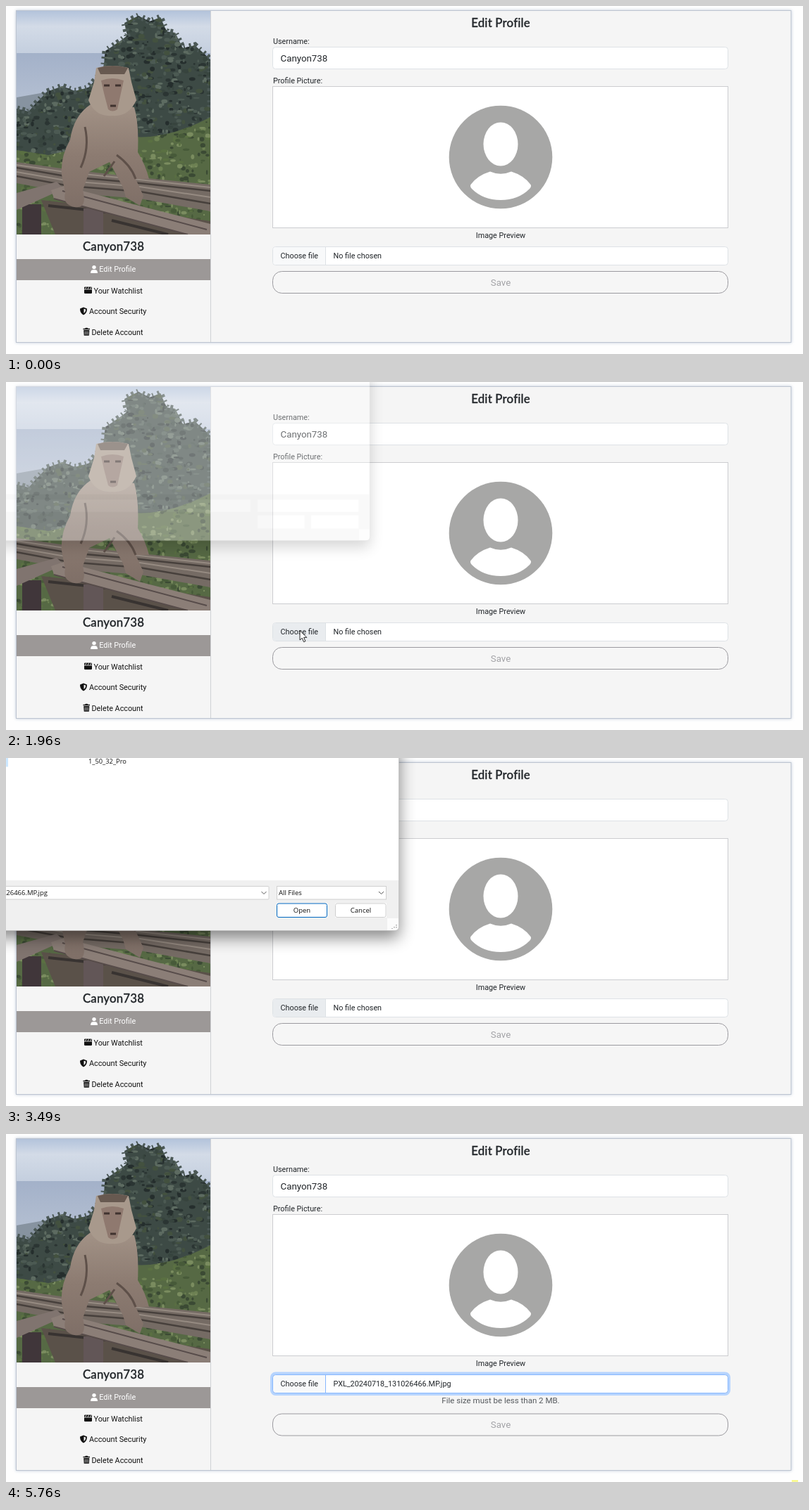
Animation of 1131 by 495 pixels, one loop 5.82 s. Source, as an HTML page:

```html
<!DOCTYPE html>
<html lang="en">
<head>
<meta charset="utf-8">
<title>Edit Profile</title>
<style>
  html, body { margin: 0; width: 100%; height: 100%; overflow: hidden; background: #fefefe; }
  svg { display: block; width: 1131px; height: 495px; font: 10.8px Roboto, sans-serif; fill: #212529; }
  .title { font: 500 16.8px Lato, sans-serif; letter-spacing: .2px; stroke: #212529; stroke-width: .3px; }
  .mid { text-anchor: middle; }
  .big { font-size: 13.3px; }
  .box { fill: #fff; stroke: #dee2e6; }
  #card { fill: #f5f5f5; stroke: #bcc4d0; filter: drop-shadow(0 0 2px #9fb0c8aa); }
  #dialog { font: 9.5px "Open Sans", sans-serif; fill: #111; }
  #dialog .frame { filter: drop-shadow(0 10px 11px #0007); }
  #dialog .control { fill: #fff; stroke: #d0d0d0; }
</style>
</head>
<body>
<svg viewBox="0 0 1131 495">
  <defs>
    <clipPath id="photoClip"><path d="M15 7H290V325H15Z"/></clipPath>
    <clipPath id="treeClip"><path id="trees" d="M138 92L141 64 162 50 172 42 168 24 188 14 204 22 219 16 228 36 240 38 251 60 268 56 290 76V230H15V146L32 150 58 122 80 114 98 121 117 116Z"/></clipPath>
    <clipPath id="grassClip"><path id="grass" d="M180 186Q230 190 290 158V325H15V205L60 212Z"/></clipPath>
    <linearGradient id="sky" x2="0" y2="1">
      <stop stop-color="#b3c3db"/><stop offset=".35" stop-color="#d3dbe7"/><stop offset="1" stop-color="#c3cede"/>
    </linearGradient>
    <linearGradient id="sea" x2="0" y2="1">
      <stop stop-color="#a3b1c9"/><stop offset="1" stop-color="#b7c2d3"/>
    </linearGradient>
    <linearGradient id="fur" x2="0" y2="1">
      <stop stop-color="#a29286"/><stop offset=".5" stop-color="#8c7b71"/><stop offset="1" stop-color="#7f6f67"/>
    </linearGradient>
  </defs>

  <rect id="card" x="14.5" y="6.5" width="1099.5" height="472"/>
  <path d="M290.5 7V478" stroke="#cfd1d5"/>

  <g id="photo" clip-path="url(#photoClip)">
    <path d="M15 7H290V70H15Z" fill="url(#sky)"/>
    <path d="M15 67H290V150H15Z" fill="url(#sea)"/>
    <path d="M15 130L60 122V155H15Z" fill="#8793a0"/>
    <use href="#trees" fill="#3d4a45" stroke="#4b5856" stroke-width="9" stroke-dasharray="4 5 2 6 3 4"/>
    <g id="leaves" clip-path="url(#treeClip)"></g>
    <use href="#grass" fill="#566944"/>
    <g id="blades" clip-path="url(#grassClip)"></g>
    <path d="M15 222L85 232 180 243 290 254V292L190 274 90 266 15 252Z" fill="#756b64"/>
    <path d="M15 230L90 243 180 251 290 263M15 242L90 256 190 264 290 281" fill="none" stroke="#47403c" stroke-width="2.500"/>
    <path d="M15 226L90 237 180 246 290 258M15 236L90 249 190 257 290 272" fill="none" stroke="#968b82" stroke-width="2"/>
    <path d="M50 276L180 290 290 306V325H70Z" fill="#5a5149"/>
    <path d="M60 284L180 297 290 318M150 305L230 325" fill="none" stroke="#383331" stroke-width="4"/>
    <path d="M23 282H50V325H23Z" fill="#40363a"/>
    <path d="M110 288H138V325H110Z" fill="#625657"/>
    <path d="M15 266L72 250 82 260 15 290Z" fill="#80746f"/>
    <path d="M64 262L82 256 200 287 290 310V325H258L68 274Z" fill="#8b7e77"/>
    <path d="M68 274L258 325M80 263L285 318" fill="none" stroke="#574c4a" stroke-width="2"/>
    <path d="M120 140Q96 156 91 190 77 215 79 240L84 266Q80 282 97 286 116 289 109 262L118 236 147 222 166 258 170 272 190 284 195 270 184 246H203Q198 226 187 208 189 168 182 144Z" fill="url(#fur)"/>
    <path d="M112 172Q119 202 106 230M154 221L139 242M157 212Q177 226 184 246" fill="none" stroke="#5e5049" stroke-width="3"/>
    <path d="M128 88Q150 82 174 88L178 108 185 134Q174 158 151 156 126 158 117 134L125 108Z" fill="#a8998c"/>
    <path d="M130 88Q151 82 173 88L168 97H134Z" fill="#675950"/>
    <path d="M135 106Q151 100 167 106L163 124 158 147Q151 152 145 147L139 124Z" fill="#8f796f"/>
    <path d="M139 113H147M155 113H163M148 142H156" stroke="#40332f" stroke-width="3"/>
  </g>

  <text class="title mid" x="152.500" y="348">Canyon738</text>
  <path d="M15 360H290V390H15Z" fill="#9c9897"/>
  <g fill="#fff">
    <circle cx="125" cy="371.600" r="2.700"/><path d="M120 380Q120 375.300 123.500 375.300H126.500Q130 375.300 130 380Z"/>
    <text x="132.300" y="378">Edit Profile</text>
  </g>
  <g fill="#111">
    <rect x="111" y="399.500" width="11" height="9.500" rx="1.300"/>
    <path d="M111 403H122M114 399.500L112.500 403M117.500 399.500L116 403M121 399.500L119.500 403" stroke="#f5f5f5" stroke-width=".8"/>
    <text x="124.500" y="408.500">Your Watchlist</text>
    <path d="M110 428.500L115 430.500Q115 437 110 439.500 105 437 105 430.500Z"/>
    <path d="M110.500 430.500L113.300 431.700Q113 435.500 110.500 437Z" fill="#f5f5f5"/>
    <text x="118" y="437.700">Account Security</text>
    <path d="M109.500 458.700H112L113 457.800H115.500L116.500 458.700H119V460.200H109.500ZM110.200 461H118.300L117.800 468.800H110.700Z"/>
    <path d="M112.300 462.500V467.500M114.300 462.500V467.500M116.300 462.500V467.500" stroke="#f5f5f5" stroke-width=".7"/>
    <text x="121.500" y="467.500">Delete Account</text>
  </g>

  <text class="title mid" x="702" y="29.500">Edit Profile</text>
  <text x="379" y="53.500">Username:</text>
  <rect class="box" x="378.500" y="58.500" width="646" height="31" rx="4"/>
  <text class="big" x="389.500" y="78.600">Canyon738</text>
  <text x="379" y="110">Profile Picture:</text>
  <rect x="378.500" y="114.500" width="646" height="201" fill="#fff" stroke="#cccdd0"/>
  <circle cx="702" cy="215" r="73.300" fill="#a7a7a6"/>
  <g fill="#fff">
    <ellipse cx="702" cy="196.500" rx="24.500" ry="31"/>
    <path d="M687 235.500Q702 242 717 235.500 735 241 744.500 254 746 257 743 260 727 276 702 276 677 276 661 260 658 257 659.500 254 669 241 687 235.500Z"/>
  </g>
  <text class="mid" x="702" y="330">Image Preview</text>

  <rect id="ring" x="377" y="340.500" width="649" height="29.500" rx="5.500" fill="none" stroke="#b6d4fe" stroke-width="4"/>
  <rect class="box" x="378.500" y="342.500" width="646" height="26" rx="4"/>
  <path id="button" d="M453.500 343H383Q379 343 379 347V364Q379 368 383 368H453.500Z"/>
  <path d="M453.500 343V368" stroke="#dee2e6"/>
  <path id="focus" d="M382.500 342.500H1020.500Q1024.500 342.500 1024.500 346.500V364.500Q1024.500 368.500 1020.500 368.500H382.500Q378.500 368.500 378.500 364.500V346.500Q378.500 342.500 382.500 342.500ZM453.500 343V368" fill="none" stroke="#86b7fe"/>
  <text x="389.500" y="359.400">Choose file</text>
  <text id="fileName" x="464.500" y="359.400"></text>
  <text id="error" class="mid" x="702" y="383.300" font-size="11.500" fill="#55595d">File size must be less than 2 MB.</text>
  <g id="save">
    <rect x="378.500" y="377.500" width="646" height="31" rx="13" fill="#f6f6f6" stroke="#9b9a9f"/>
    <text class="mid big" x="702" y="397.700" fill="#a3a3a7">Save</text>
  </g>

  <g id="dialog">
    <path class="frame" d="M-40 -40H557.500V239Q557.500 245.500 551 245.500H-40Z" fill="#fff" stroke="#b5b5b5" stroke-width=".6"/>
    <path d="M-40 174H557V239Q557 245 551 245H-40Z" fill="#f0f0f0"/>
    <path d="M541 228H557V239Q557 245 551 245H541Z" fill="#fcfcfc"/>
    <path id="blanks" d="M-40 182H373V201H-40ZM384 182H540V201H384ZM384 206.500H456.500V227H384ZM467 206.500H540V227H467Z" fill="#fff"/>
    <g id="controls">
      <path id="item" d="M0 0H3V12.500H0Z"/>
      <text x="117" y="8" font-size="9.300">1_50_32_Pro</text>
      <rect id="field" class="control" x="-40" y="182.500" width="413" height="18.500" rx="1"/>
      <text id="picked" x="59" y="195" text-anchor="end">PXL_20240718_131026466.MP.jpg</text>
      <rect class="control" x="384.500" y="182.500" width="155" height="18.500"/>
      <path d="M362.500 190L366 193.500 369.500 190M529 190L532.500 193.500 536 190" fill="none" stroke="#555"/>
      <text x="387" y="195">All Files</text>
      <rect class="control" x="384.500" y="207" width="71" height="19.500" rx="2.500" style="stroke:#0067c0"/>
      <text class="mid" x="420" y="220">Open</text>
      <rect class="control" x="467.500" y="207" width="71.500" height="19.500" rx="2.500"/>
      <text class="mid" x="503.500" y="220">Cancel</text>
      <path d="M554 237V243M551 240V243M548 242V243" stroke="#aaa" stroke-width="1.600" stroke-dasharray="1.500"/>
    </g>
  </g>

  <path id="cursor" d="M0 0V13.500L3.200 10.700 5.600 16.200 7.900 15.200 5.600 9.900H9.800Z" fill="#fff" stroke="#111" stroke-width=".9"/>
  <path id="mark" d="M1115 493.500H1124" stroke="#f7f76a" stroke-width="2"/>
</svg>
<script>
const $ = id => document.getElementById(id);
const LOOP = 5820;
const clamp = v => Math.min(1, Math.max(0, v));
const ramp = (t, from, to) => clamp((t - from) / (to - from));
const show = (id, on) => $(id).style.visibility = on ? 'visible' : 'hidden';

// Foliage and grass from a seeded generator
let seed = 7;
const random = () => (seed = seed * 16807 % 2147483647) / 2147483647;
function scatter(id, count, top, height, tones) {
  let marks = '';
  for (let i = 0; i < count; i++) {
    const x = 15 + random() * 275, y = top + random() * height;
    marks += `<ellipse cx="${x}" cy="${y}" rx="${1 + random() * 4}" ry="${1 + random() * 2.5}" fill="${tones[i % tones.length]}"/>`;
  }
  $(id).innerHTML = marks;
}
scatter('leaves', 1100, 10, 205, ['#2b3533', '#4c5a53', '#37443e', '#5d6b61', '#252e2d', '#43513f']);
scatter('blades', 700, 160, 165, ['#475a39', '#6d8153', '#5a7042', '#3b4a34', '#7a8c5f']);

// Pointer trips: [time, x, y]
const trips = [
  [[750, 598, 409], [880, 510, 384], [1060, 417, 353.5], [2130, 417, 353.5], [2480, 151, 118], [2560, 151, 118], [2790, -20, -20]],
  [[3970, 67, 206], [4240, 330, 350], [4500, 541, 442], [4580, 541, 442], [4720, 592, 462], [4850, 637, 425], [4960, 625, 391], [5660, 625, 391], [5760, 1135, 500]]
];

function pointerAt(t) {
  const trip = trips.find(p => t >= p[0][0] && t < p[p.length - 1][0]);
  if (!trip) return null;
  const i = trip.findIndex(p => p[0] > t);
  const [t0, x0, y0] = trip[i - 1], [t1, x1, y1] = trip[i];
  const k = ramp(t, t0, t1);
  return [x0 + (x1 - x0) * k, y0 + (y1 - y0) * k];
}

function draw(t) {
  const ring = t < 3000 ? ramp(t, 1220, 1430) * (1 - ramp(t, 1580, 1650)) : +(t >= 3720);
  $('ring').style.opacity = $('focus').style.opacity = ring;

  const hover = t < 3000 ? ramp(t, 950, 1060) : 1 - ramp(t, 3740, 3820);
  const mix = (a, b) => a + (b - a) * hover;
  $('button').style.fill = `rgb(${mix(248, 233)},${mix(249, 236)},${mix(250, 239)})`;

  const chosen = t >= 3760;
  $('fileName').textContent = chosen ? 'PXL_20240718_131026466.MP.jpg' : 'No file chosen';
  show('error', chosen);
  $('save').setAttribute('transform', `translate(0 ${chosen ? 20.5 : 0})`);

  const open = t >= 1960 && t < 3720;
  const grow = 1 - (1 - ramp(t, 1950, 2170)) ** 2;
  const scale = .91 + .09 * grow;
  $('dialog').style.display = open ? '' : 'none';
  $('dialog').style.opacity = ramp(t, 1930, 2020);
  $('dialog').setAttribute('transform', `translate(${50 * (1 - scale)} 0) scale(${scale})`);
  $('controls').style.display = t >= 2130 ? '' : 'none';
  $('item').style.fill = t >= 3340 ? '#cce8ff' : t >= 2700 ? '#e5f3ff' : '#fff';
  $('field').style.stroke = t >= 2200 && t < 3490 ? '#0078d4' : '#d0d0d0';
  show('picked', t >= 3340);

  const pointer = pointerAt(t);
  show('cursor', pointer);
  if (pointer) $('cursor').setAttribute('transform', `translate(${pointer})`);
  show('mark', t >= 5760);
}

function tick() {
  draw(performance.now() % LOOP);
  requestAnimationFrame(tick);
}
tick();
</script>
</body>
</html>
```
